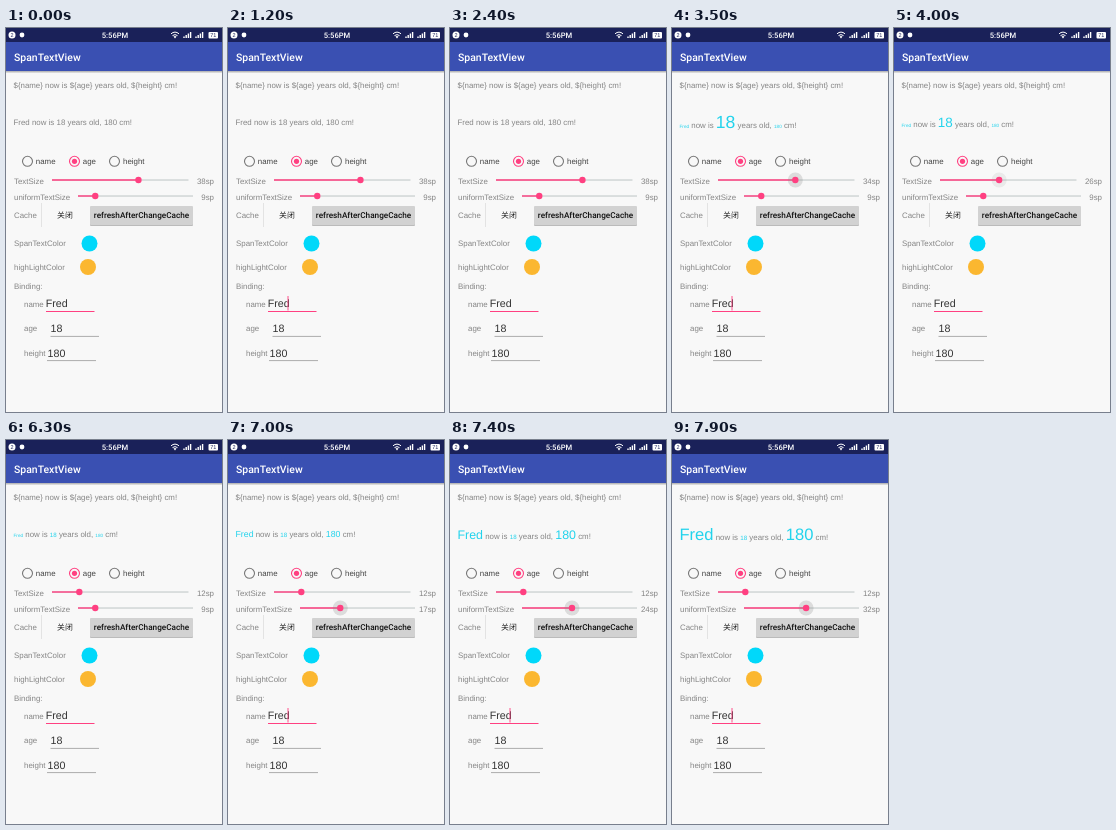
These frames come from a looping animation (216x384 px, 8000 ms). An HTML page:

```html
<!DOCTYPE html>
<html lang="en">
<head>
<meta charset="utf-8">
<title>SpanTextView</title>
<style>
html, body { margin: 0; width: 100%; height: 100%; overflow: hidden; background: #f8f8f8; }
svg { display: block; width: 100%; height: 100%; font: 7.9px "Liberation Sans", "Noto Sans CJK SC", sans-serif; fill: #858585; }
text { white-space: pre; text-rendering: geometricPrecision; }
.dark { fill: #444; }
.field { font-size: 10.7px; fill: #333; }
.medium { font-family: Roboto, sans-serif; font-weight: 500; }
.hot { fill: #22d3ec; }
.pink { fill: #ff4081; }
.end { text-anchor: end; }
</style>
</head>
<body>
<svg viewBox="0 0 216 384">
  <defs>
    <linearGradient id="shade" x2="0" y2="1">
      <stop stop-color="#aaa"/><stop offset="1" stop-color="#f8f8f8"/>
    </linearGradient>
  </defs>
  <rect width="216" height="384" fill="#f8f8f8"/>
  <rect y="43" width="216" height="2.5" fill="url(#shade)"/>
  <rect width="216" height="43" fill="#3a50b2"/>
  <rect width="216" height="14" fill="#1a2159"/>

  <g fill="#fff">
    <circle cx="6" cy="7" r="3.5"/>
    <text x="6" y="9" font-size="5.5" text-anchor="middle" fill="#1a2159">2</text>
    <circle cx="16" cy="7" r="2.4"/>
    <text class="medium" x="109" y="9.8" font-size="7.6" text-anchor="middle">5:56PM</text>
    <path d="M169 10.5l-1.5-2q1.5-1 3 0z"/>
    <path d="M165 5.8q4-3.4 8 0M166.5 7.6q2.5-2 5 0" fill="none" stroke="#fff"/>
    <path d="M178 10v-1.5M180.2 10v-3M182.4 10v-4.5M184.6 10v-6M190 10v-1.5M192.2 10v-3M194.4 10v-4.5M196.6 10v-6" stroke="#fff" stroke-width="1.4"/>
    <rect x="202.5" y="4" width="9.5" height="6.5" rx="1"/>
    <text x="207.2" y="9.2" font-size="5.5" text-anchor="middle" fill="#1a2159">71</text>
    <text class="medium" x="8" y="32.5" font-size="10.45">SpanTextView</text>
  </g>
  <text x="7.5" y="60">${name} now is ${age} years old, ${height} cm!</text>
  <text id="line" x="7.5"><tspan class="uniform">Fred</tspan> now is <tspan id="age">18</tspan> years old, <tspan class="uniform">180</tspan> cm!</text>

  <g fill="none" stroke="#777" stroke-width="1.1">
    <circle cx="21.5" cy="133.3" r="5"/>
    <circle cx="68.5" cy="133.3" r="5" stroke="#ff4081"/>
    <circle cx="108.5" cy="133.3" r="5"/>
  </g>
  <circle class="pink" cx="68.5" cy="133.3" r="2.6"/>
  <g class="dark">
    <text x="29.8" y="136">name</text>
    <text x="76.8" y="136">age</text>
    <text x="117" y="136">height</text>
  </g>

  <text x="8" y="156">TextSize</text>
  <text x="8" y="172">uniformTextSize</text>
  <g id="sliders"></g>

  <text x="8" y="190">Cache</text>
  <path d="M35.5 175v24" stroke="#ddd" stroke-width=".8"/>
  <text x="59" y="190" text-anchor="middle" fill="#222">关闭</text>
  <rect x="84" y="179" width="103" height="19" rx="1" fill="#bbb"/>
  <rect x="84" y="178" width="103" height="19" rx="1" fill="#d2d2d2"/>
  <text class="medium" x="135.5" y="190" font-size="8.2" fill="#111" text-anchor="middle">refreshAfterChangeCache</text>

  <text x="8" y="218">SpanTextColor</text>
  <circle cx="83.5" cy="215.5" r="8" fill="#00d8fa"/>
  <text x="8" y="242">highLightColor</text>
  <circle cx="82" cy="239" r="8" fill="#fbb730"/>
  <text x="8" y="260.5">Binding:</text>
  <text x="18" y="278.5">name</text>
  <text x="18" y="303">age</text>
  <text x="18" y="328">height</text>
  <g class="field">
    <text x="39.7" y="279.3">Fred</text>
    <text x="44.5" y="304.2">18</text>
    <text x="41.5" y="329">180</text>
  </g>
  <path d="M40 283.5h48.5" stroke="#ff4081" stroke-width="1.2"/>
  <path d="M44.5 308.4h48.5M41 332.6h49" stroke="#999" stroke-width=".8"/>
  <path id="cursor" d="M60 268v14.5" stroke="#ff4081" stroke-width=".9"/>
</svg>
<script>
const LOOP = 8000, PX_PER_SP = 0.517, FADE = 300;
const $ = id => document.getElementById(id);

// Thumb and value keys are [ms, sp]; the value trails the thumb on fast drags.
const sliders = [
  { x: 46, end: 182.5, y: 152, press: [3350, 3850],
    thumb: [[3300, 38], [3900, 26], [4100, 26], [5000, 16], [5400, 12]],
    value: [[3300, 38], [3900, 26], [4200, 26], [5000, 19], [5600, 12]] },
  { x: 72, end: 187, y: 168, press: [6450, LOOP],
    thumb: [[6400, 9], [7000, 21], [7900, 32.4]],
    value: [[6500, 9], [7000, 17], [7900, 32]] }
];

for (const s of sliders) {
  const group = document.createElementNS("http://www.w3.org/2000/svg", "g");
  group.innerHTML = `
    <path d="M${s.x} ${s.y}H${s.end}" stroke="#bcc4c4"/>
    <path stroke="#ff4081" stroke-width="1.4"/>
    <circle cy="${s.y}" r="7.5" fill="#888"/>
    <circle class="pink" cy="${s.y}" r="3.2"/>
    <text class="end" x="208" y="${s.y + 3.8}"></text>`;
  $("sliders").append(group);
  [, s.bar, s.halo, s.dot, s.label] = group.children;
}

function track(keys, t) {
  const i = keys.findIndex(k => k[0] > t);
  if (i < 0) return keys[keys.length - 1][1];
  if (i === 0) return keys[0][1];
  const [t0, a] = keys[i - 1], [t1, b] = keys[i];
  return a + (b - a) * (t - t0) / (t1 - t0);
}

function drawSlider(s, t) {
  const x = s.x + (s.end - s.x) * track(s.thumb, t) / 60;
  const sp = Math.round(track(s.value, t));
  const [down, up] = s.press;
  s.bar.setAttribute("d", `M${s.x} ${s.y}H${x}`);
  s.dot.setAttribute("cx", x);
  s.halo.setAttribute("cx", x);
  s.halo.setAttribute("opacity", track([[down, 0], [down + 100, 0.25], [up, 0.25], [up + FADE, 0]], t));
  s.label.textContent = sp + "sp";
  return sp;
}

function highlight(span, sp, on) {
  span.classList.toggle("hot", on);
  span.style.fontSize = on ? sp * PX_PER_SP + "px" : "";
}

function draw(now) {
  const t = now % LOOP, on = t >= 3400;
  const [age, uniform] = sliders.map(s => drawSlider(s, t));
  highlight($("age"), age, on);
  document.querySelectorAll(".uniform").forEach(span => highlight(span, uniform, on));
  const grow = on ? Math.max(0, age - 14, uniform - 14) : 0;
  $("line").setAttribute("y", 96.8 + grow * 0.18);
  const blink = t % 450;
  $("cursor").style.display = blink >= 175 && blink < 400 ? "" : "none";
  requestAnimationFrame(draw);
}
requestAnimationFrame(draw);
</script>
</body>
</html>
```
